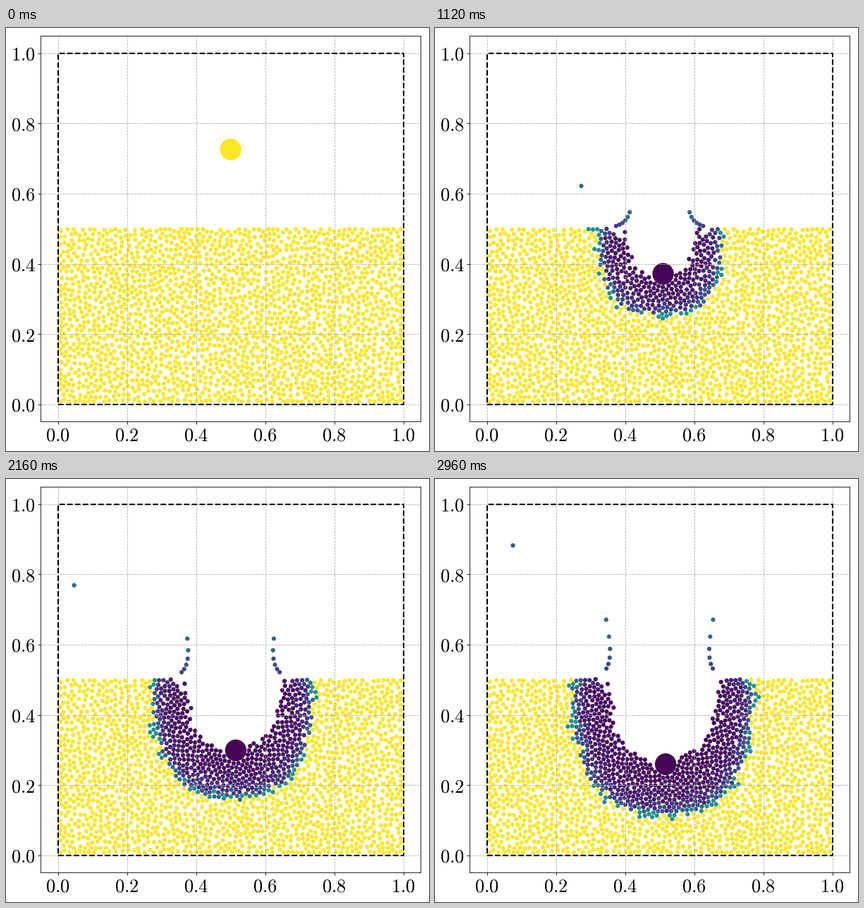
Recreate the animation shown at these times as a matplotlib script. Size 600 by 600 pixels, loop 3 s.

```python
import numpy as np
import matplotlib.pyplot as plt
from matplotlib.animation import FuncAnimation
from matplotlib.collections import EllipseCollection

FRAMES, INTERVAL = 75, 40
GRAINS, CONTACT = 1950, 0.0128
R_BALL, R_DOT, SURFACE = 0.031, 0.0063, 0.4985
IMPACT, LAUNCH = 9, 10

rng = np.random.default_rng(4)
plt.rcParams["mathtext.fontset"] = "cm"


def depth(t):
    """Depth of the ball's lowest point below the bed surface."""
    free = 0.0217 * (t - IMPACT)
    slowed = 0.0474 * max(t - 10, 0) ** 0.42
    return free if t < 11 else min(free, slowed)


def ball_at(t):
    d = depth(t)
    return np.array([0.5 + 0.064 * max(d, 0), 0.5 - d + R_BALL])


def front_at(t):
    """Centre, half width and depth of the shock front."""
    age = max(t - IMPACT, 0.01) / 9
    return np.array([ball_at(t)[0] - 0.008, 0.5]), 0.145 * age ** 0.29, 0.19 * age ** 0.35


def front_ratio(p, t):
    """Distance from the impact point, 1 on the front."""
    c, w, b = front_at(t)
    x, y = np.abs(p - c).T
    return ((x / w) ** 2.7 + (y / b) ** 2.7) ** (1 / 2.7)


def spread(rest, t):
    """Snowplow: grains within the front are packed around the crater."""
    if t <= IMPACT:
        return rest
    c, _, b = front_at(t)
    q = front_ratio(rest, t) + 1e-6
    hollow = (0.85 * depth(t) / b) ** 2
    packed = np.sqrt(hollow + q ** 2 * (1 - hollow))
    return c + (rest - c) * np.where(q < 1, packed / q, 1)[:, None]


def relax(p, gap, limit, rounds, steps):
    """Push overlapping discs apart, applying limit(p) after each step."""
    n = len(p)
    for _ in range(rounds):
        x, y = p.T
        near = (x[:, None] - x) ** 2 + (y[:, None] - y) ** 2 < (1.5 * gap) ** 2
        i, j = np.nonzero(np.triu(near, 1))
        for _ in range(steps):
            v = p[i] - p[j]
            dist = np.hypot(v[:, 0], v[:, 1]) + 1e-9
            v *= (0.4 * np.clip(gap - dist, 0, None) / dist)[:, None]
            for k in (0, 1):
                p[:, k] += np.bincount(i, v[:, k], n) - np.bincount(j, v[:, k], n)
            limit(p)


def keep_in_box(p, top=SURFACE):
    p[:, 0] = np.clip(p[:, 0], 0.0075, 0.9925)
    p[:, 1] = np.clip(p[:, 1], 0.0075, top)


def carve(p, t, rough):
    """Move discs out of the crater and off the ball."""
    d, ball = depth(t), ball_at(t)
    width = 0.545 * d * rough
    dx = p[:, 0] - ball[0]
    u = np.clip((p[:, 1] - 0.5 + d) / d, 0, 1)
    inside = np.minimum(np.abs(dx) / width - 1 + (1 - u) ** 2.2, 0)
    gx = np.where(dx < 0, -1, 1) / width
    gy = -2.2 * (1 - u) ** 1.2 / d
    step = inside / (gx ** 2 + gy ** 2)
    p[:, 0] -= step * gx
    p[:, 1] -= step * gy

    v = p - ball
    dist = np.hypot(v[:, 0], v[:, 1]) + 1e-9
    p += v * (np.clip(R_BALL + CONTACT / 2 - dist, 0, None) / dist)[:, None]


def make_bed():
    """Throw grains at random, rejecting those that overlap."""
    p = np.full((GRAINS, 2), 9.0)
    n = 0
    for q in rng.uniform((0.003, 0.003), (0.997, 0.502), (60000, 2)):
        if n < GRAINS and ((p[:n] - q) ** 2).sum(axis=1).min(initial=9) > 0.0122 ** 2:
            p[n] = q
            n += 1
    p = p[:n]
    keep_in_box(p)
    relax(p, 0.0131, keep_in_box, 6, 25)
    return p


def make_spray(per_side=6):
    """Launch points, velocities and hit counts of the ejected grains."""
    start, speed, hits = [(0.43, 0.52)], [(-0.0087, 0.00567)], [2]
    for side in (-1, 1):
        for k in range(per_side):
            vy = 0.0027 * 0.72 ** k
            start.append((0.5 + side * (0.06 + 0.011 * k), SURFACE))
            speed.append((side * (0.0004 + 0.4 * vy), vy))
            hits.append(2 + k // 2)
    return np.array(start), np.array(speed), np.array(hits)


def fly(spray, t):
    """Straight flight with a lossy bounce off the left wall."""
    start, speed, hits = spray
    p = start + speed * (t - LAUNCH)
    out = p[:, 0] < R_DOT
    p[out, 0] = R_DOT + 0.52 * (R_DOT - p[out, 0])
    return p, hits + out


def take_homes(bed, launch):
    """Pick the bed grain nearest to each launch point."""
    picked = []
    for q in launch:
        dist = np.hypot(*(bed - q).T)
        dist[picked] = 9
        picked.append(int(np.argmin(dist)))
    return bed[picked], np.delete(bed, picked, axis=0)


def simulate():
    spray = make_spray()
    homes, bed = take_homes(make_bed(), spray[0])
    n = len(bed)
    rest = bed.copy()
    active = (np.abs(bed[:, 0] - 0.51) < 0.32) & (bed[:, 1] > 0.04)
    top = (SURFACE + 0.06 * rng.random(n) ** 4)[active]
    rough = rng.uniform(0.87, 1.13, active.sum())
    reach = rng.normal(1, 0.025, n)
    rate = 200 * rng.uniform(0.6, 1.6, n) * np.where(bed[:, 1] > 0.485, 0.5, 1)
    states = []
    for t in range(FRAMES):
        for s in (t - 0.5, t):
            if s <= IMPACT:
                continue

            def limit(q):
                carve(q, s, rough)
                keep_in_box(q, top)

            p = bed[active] + spread(rest[active], s) - spread(rest[active], s - 0.5)
            limit(p)
            relax(p, CONTACT, limit, 1, 40)
            bed[active] = p

        hits = np.zeros(n)
        if t > IMPACT:
            behind = (reach - front_ratio(rest, t)) * front_at(t)[1]
            moved = np.hypot(*(bed - rest).T)
            hits = np.maximum(np.ceil(behind * rate), moved > 0.003)
        air, air_hits = fly(spray, t)
        air = homes + (air - homes) * np.clip((t - LAUNCH) / 4, 0, 1)
        ball_hits = np.ceil(400 * max(depth(t), 0))
        states.append((
            np.vstack([bed, air, ball_at(t)]),
            np.concatenate([hits, air_hits * (t > LAUNCH), [ball_hits]]),
        ))
    return states


states = simulate()

fig = plt.figure(figsize=(6, 6), dpi=100, facecolor="white")
ax = fig.add_axes([49 / 600, 41.6 / 600, 539.2 / 600, 547.3 / 600])
ax.set(xlim=(-0.05, 1.05), ylim=(-0.05, 1.05))
ticks = np.arange(6) / 5
labels = [f"${v:.1f}$" for v in ticks]
ax.set_xticks(ticks, labels)
ax.set_yticks(ticks, labels)
ax.tick_params(labelsize=19, length=2.8, width=0.6, pad=2.6)
ax.grid(True, linestyle="--", linewidth=0.6, color="#b0b0b0")
for spine in ax.spines.values():
    spine.set_linewidth(0.6)
ax.plot([0, 1, 1, 0, 0], [0, 0, 1, 1, 0], "k--", linewidth=1.5)

size = np.full(len(states[0][0]), 2 * R_DOT)
size[-1] = 2 * R_BALL
grains = EllipseCollection(size, size, np.zeros_like(size), units="xy",
                           offsets=states[0][0], offset_transform=ax.transData,
                           linewidths=0, zorder=1)
ax.add_collection(grains, autolim=False)


def update(t):
    pos, hits = states[t]
    grains.set_offsets(pos)
    grains.set_facecolor(plt.cm.viridis(1 / (1 + hits)))
    return (grains,)


anim = FuncAnimation(fig, update, frames=FRAMES, interval=INTERVAL,
                     repeat=True, repeat_delay=0, blit=False)
plt.show()
```
